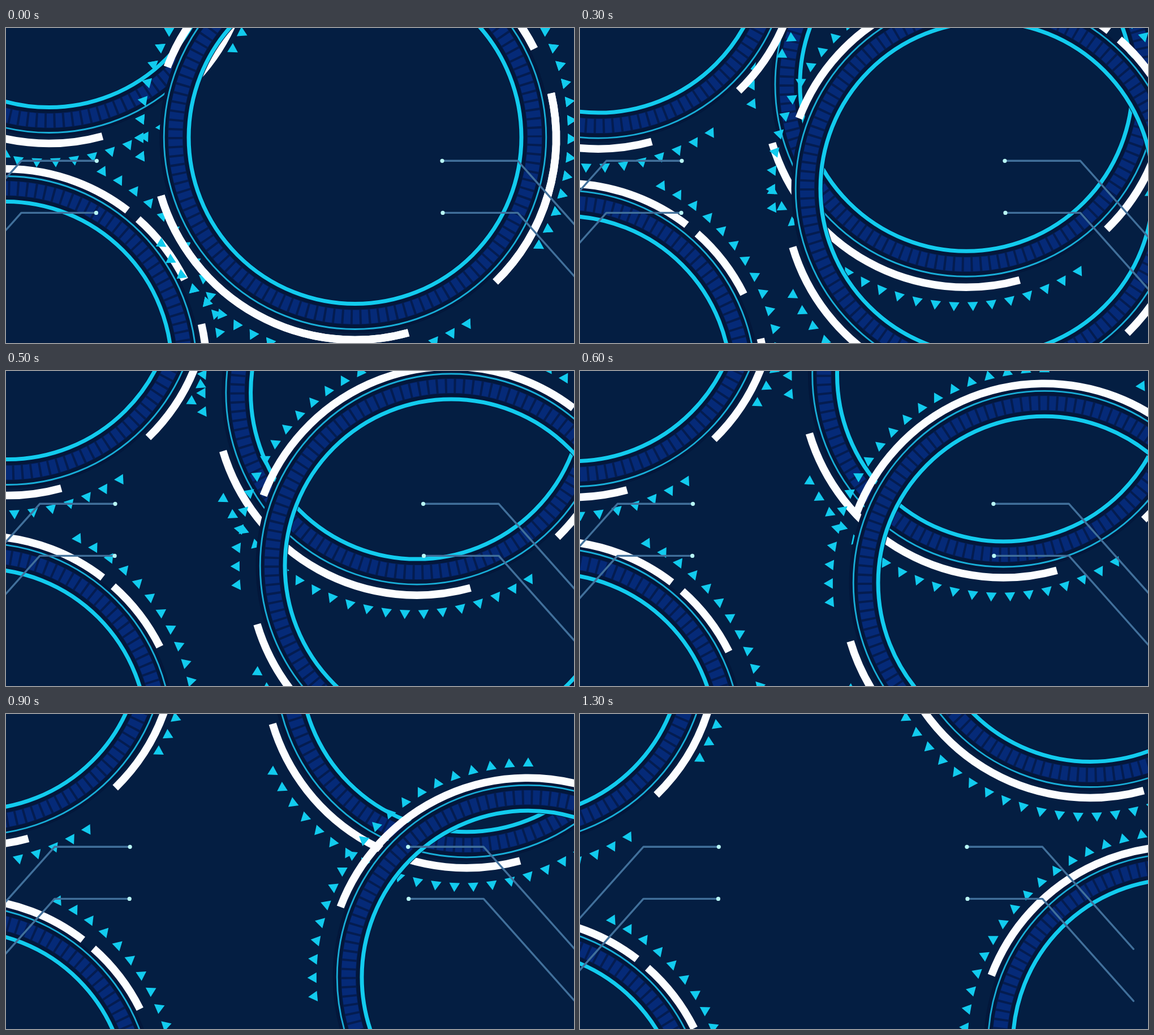
An HTML page with a canvas for the animation above (1400 ms loop, 1004x558 px).

```html
<!DOCTYPE html>
<html lang="en">
<head>
<meta charset="utf-8">
<title>Drifting dials</title>
<style>
  html, body { margin: 0; width: 100%; height: 100%; overflow: hidden; background: #041e42; }
  canvas { display: block; }
</style>
</head>
<body>
<canvas id="stage" width="1004" height="558"></canvas>
<script>
const ctx = document.getElementById('stage').getContext('2d');
const STEP = 100, STEPS = 14;
const CYAN = '#12cbee', RAD = Math.PI / 180;

// Start centre and shift per step, back to front
const dials = [
  { x: 616.5, y: 195, dx: 21.92, dy: -31.08 },
  { x: -1.5, y: 604, dx: -8.77, dy: 8.54 },
  { x: 75.5, y: -153, dx: -14.55, dy: 3.2 },
  { x: 616.5, y: 195, dx: 34, dy: 30.3 }
];

// White arcs: radius, from, to (degrees)
const arcs = [
  [354.5, -159.2, -52.4],
  [354.5, -48.5, -26.5],
  [356, -12.9, 45.7],
  [357.5, 74.6, 163.4]
];

// Rows of 20 triangles: centre, radius, first angle, angle step
const rows = [
  [0.5, -0.5, 379.5, -90, -5],
  [1, -9.7, 381, -63.3, 5],
  [-6.5, 10, 379.5, 152.2, -5]
];

function stroke(width, color) {
  ctx.lineWidth = width;
  ctx.strokeStyle = color;
  ctx.stroke();
}

// Full rings sit slightly high and are a touch taller than wide
function ring(rx, ry, width, color) {
  ctx.beginPath();
  ctx.ellipse(0.5, -1.5, rx, ry, 0, 0, 2 * Math.PI);
  stroke(width, color);
}

function triangle(x, y, angle) {
  ctx.beginPath();
  for (let k = 0; k < 3; k++) {
    const a = (angle + k * 120) * RAD;
    ctx.lineTo(x + 10.8 * Math.cos(a), y + 10.8 * Math.sin(a));
  }
  ctx.fill();
}

function dial(x, y) {
  ctx.save();
  ctx.translate(x, y);
  ring(317.5, 318.5, 56, '#03173a');

  const pitch = 2 * Math.PI * 318 / 126;
  ring(317.5, 318.5, 27, '#041c50');
  ctx.setLineDash([pitch - 4, 4]);
  ring(317.5, 318.5, 25, '#052a78');
  ctx.setLineDash([]);

  ring(294, 295, 7, CYAN);
  ring(337.8, 340, 2.8, '#18aed8');
  for (const [r, from, to] of arcs) {
    ctx.beginPath();
    ctx.arc(0, 0, r, from * RAD, to * RAD);
    stroke(13.5, '#fcfdff');
  }

  ctx.fillStyle = CYAN;
  for (const [cx, cy, r, first, turn] of rows) {
    for (let i = 0; i < 20; i++) {
      const deg = first + i * turn;
      triangle(cx + r * Math.cos(deg * RAD), cy + r * Math.sin(deg * RAD), deg);
    }
  }
  ctx.restore();
}

// side: 1 runs to the right, -1 to the left
function callout(x, corner, y, side) {
  ctx.beginPath();
  ctx.moveTo(x, y);
  ctx.lineTo(corner, y);
  ctx.lineTo(corner + side * 161, y + 181);
  ctx.lineCap = ctx.lineJoin = 'round';
  stroke(3.4, '#41709b');
  ctx.lineCap = 'butt';
  ctx.beginPath();
  ctx.arc(x, y, 3.6, 0, 7);
  ctx.fillStyle = '#b8f6f4';
  ctx.fill();
}

function draw(now) {
  const n = Math.floor(now / STEP) % STEPS;
  ctx.fillStyle = '#041e42';
  ctx.fillRect(0, 0, 1004, 558);
  for (const d of dials) dial(d.x + n * d.dx, d.y + n * d.dy);

  const left = n * 6.54, right = -n * 6.7;
  callout(160.3 + left, 27 + left, 235.3, -1);
  callout(159.4 + left, 27 + left, 327.4, -1);
  callout(771 + right, 904.5 + right, 235.3, 1);
  callout(772 + right, 904.5 + right, 327.4, 1);
}

const start = performance.now();
function tick() {
  draw(performance.now() - start);
  requestAnimationFrame(tick);
}
tick();
</script>
</body>
</html>
```
